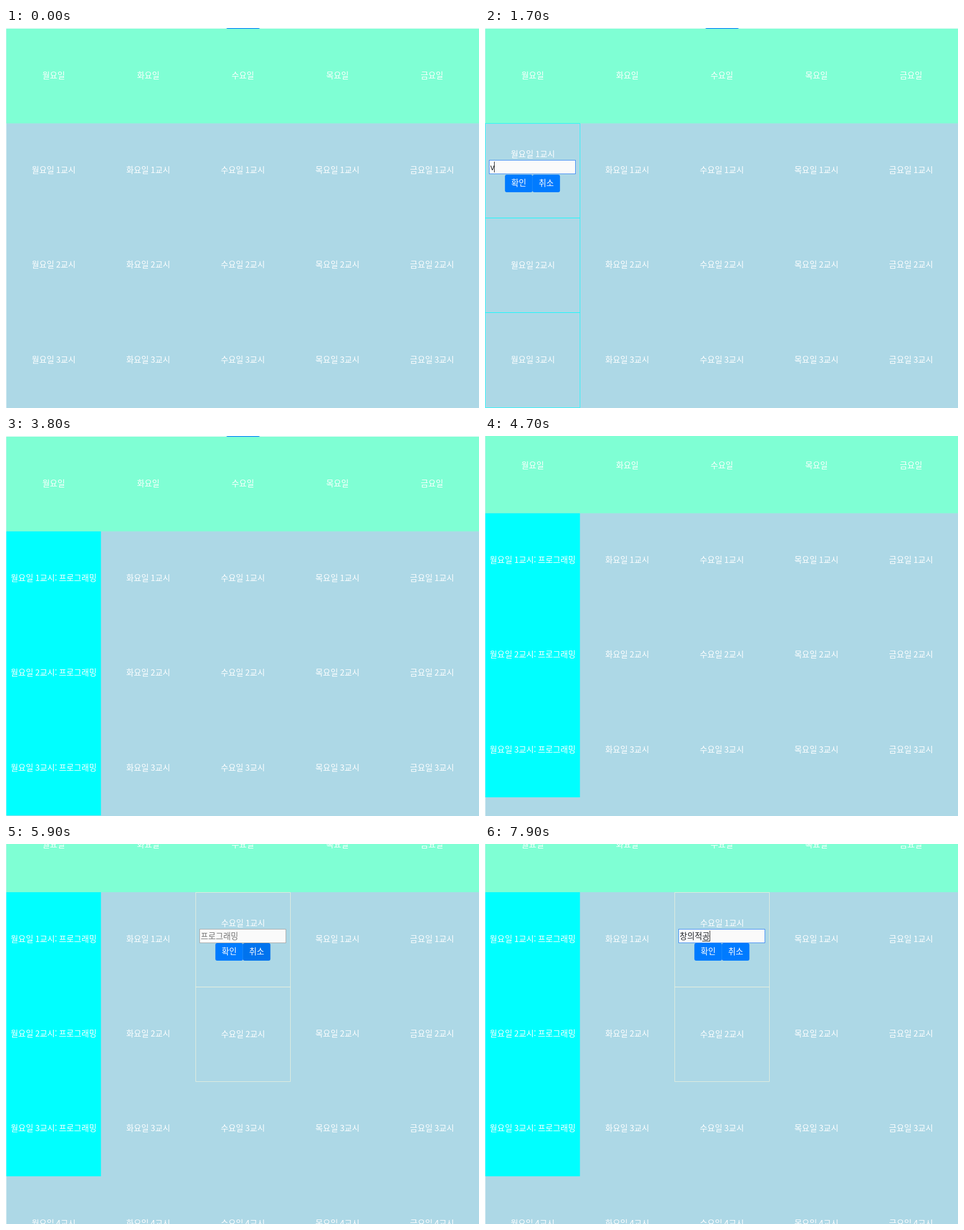
Animation of 834x671 px, one loop 8 s. Source, as an HTML page with a canvas:

```html
<!DOCTYPE html>
<html lang="ko">
<head>
<meta charset="utf-8">
<style>
html, body { margin: 0; width: 100%; height: 100%; overflow: hidden; background: #fff; }
canvas { display: block; }
</style>
</head>
<body>
<canvas id="stage" width="834" height="671"></canvas>
<script>
const ctx = document.getElementById('stage').getContext('2d');
const LOOP = 8000;
const DAYS = ['월', '화', '수', '목', '금'];
const SUBJECT = '프로그래밍';
const FONT = '300 14.45px "Noto Sans CJK KR", "Noto Sans CJK", "Noto Sans", sans-serif';
const LEFT = 0.6, TOP = 1.2, COL = 166.8, ROW = 167.2;
const BLUE = '#007bff';

// [time, text, composing]
const MON_KEYS = [
  [1700, 'v'], [2200, ''], [2500, 'ㅍ', 1], [2700, '프', 1], [2800, '플', 1],
  [2900, '프로', 1], [3000, '프록', 1], [3100, '프로그', 1], [3200, '프로글', 1],
  [3300, '프로그래', 1], [3400, '프로그램', 1], [3500, SUBJECT, 1], [3700, SUBJECT]
];
const WED_KEYS = [
  [6400, 'ㅊ', 1], [6600, '차', 1], [6800, '창', 1], [6900, '창ㅇ', 1],
  [7000, '창의', 1], [7100, '창의ㅈ', 1], [7300, '창의저', 1], [7400, '창의적', 1],
  [7600, '창의적ㄱ', 1], [7700, '창의적고', 1], [7900, '창의적공', 1]
];

const EDITS = [
  { day: 0, from: 600, to: 3800, picks: [600, 700, 1100], hover: 1400, focus: 1600, keys: MON_KEYS, line: '#00ffff' },
  { day: 2, from: 5100, to: LOOP, picks: [5100, 5400], hover: 5900, focus: 6000, keys: WED_KEYS, line: '#f5f5dc' }
];

function box(x, y, w, h, color) {
  ctx.fillStyle = color;
  ctx.fillRect(x, y, w, h);
}

function label(text, x, y, color = '#fff', align = 'center') {
  ctx.fillStyle = color;
  ctx.textAlign = align;
  ctx.fillText(text, x, y + 5);
}

function button(text, x, y, w, color) {
  ctx.fillStyle = color;
  ctx.beginPath();
  ctx.roundRect(x, y, w, 31, 3.3);
  ctx.fill();
  label(text, x + w / 2, y + 15);
}

const scrollAt = t => t < 4700 ? 0 : t < 4800 ? 32 : 83.3;
const colX = day => LEFT + COL * day;
const rowY = (row, scroll) => TOP + ROW * row - scroll;

function drawInput(edit, t, x, y) {
  const focused = t >= edit.focus;
  box(x, y, 153, 25, focused ? '#3f8cf5' : '#a9a9a9');
  box(x + 1, y + 1, 151, 23, '#fafafa');

  const [, text, composing] = edit.keys.findLast(k => k[0] <= t) || [0, ''];
  const left = x + 2.2, mid = y + 12.6;
  if (text) label(text, left, mid, '#212529', 'left');
  else label(SUBJECT, left, mid, '#757575', 'left');
  if (!focused) return;

  const end = left + ctx.measureText(text).width;
  box(Math.floor(end), y + 3, 1, 19, '#222');
  if (composing) {
    const start = left + ctx.measureText(text.slice(0, -1)).width;
    box(Math.round(start), y + 21, Math.round(end - start), 1, '#222');
  }
}

function drawEdit(edit, t, scroll) {
  const x = Math.floor(colX(edit.day));
  const y = rowY(1, scroll);
  ctx.strokeStyle = edit.line;
  ctx.lineWidth = 0.75;
  ctx.beginPath();
  edit.picks.forEach((start, i) => {
    if (t < start) return;
    const top = Math.floor(rowY(i + 1, scroll));
    const bottom = Math.floor(rowY(i + 2, scroll));
    ctx.rect(x + 0.5, top + 0.5, 167, bottom - top);
  });
  ctx.stroke();

  drawInput(edit, t, x + 7, Math.floor(y + 65.4));
  const hovered = t >= edit.hover && t < edit.focus;
  const buttonY = Math.floor(y + 90.8);
  button('확인', x + 35.2, buttonY, 48.6, BLUE);
  button('취소', x + 83.8, buttonY, 48.4, hovered ? '#0073ee' : BLUE);
}

function draw(t) {
  const scroll = scrollAt(t);
  const saved = t >= EDITS[0].to;
  const active = EDITS.find(e => t >= e.from && t < e.to);
  const body = rowY(1, scroll);
  ctx.font = FONT;

  box(0, 0, 834, 671, '#fff');
  box(LEFT, rowY(0, scroll), 834, 671 + scroll, '#add8e6');
  box(LEFT, rowY(0, scroll), 834, ROW, '#7fffd4');
  if (saved) box(LEFT, body, COL, ROW * 3, '#00ffff');

  for (let row = 0; row < 5; row++) {
    DAYS.forEach((day, i) => {
      const picked = active && active.day === i && t >= active.picks[row - 1];
      let text = day + '요일';
      if (row) text += ` ${row}교시`;
      if (saved && i === 0 && row > 0 && row < 4) text += ': ' + SUBJECT;
      let mid = rowY(row, scroll) + 82.8;
      if (picked) mid += row === 1 ? -27.8 : 0.7;
      label(text, colX(i + 0.5) + (picked ? 0.4 : 0), Math.round(mid));
    });
  }

  if (!scroll) {
    ctx.fillStyle = BLUE;
    ctx.beginPath();
    ctx.roundRect(388, -29, 60, 30.3, 3.3);
    ctx.fill();
  }
  if (active) drawEdit(active, t, scroll);
}

function tick(now) {
  draw(now % LOOP);
  requestAnimationFrame(tick);
}
requestAnimationFrame(tick);
</script>
</body>
</html>
```
